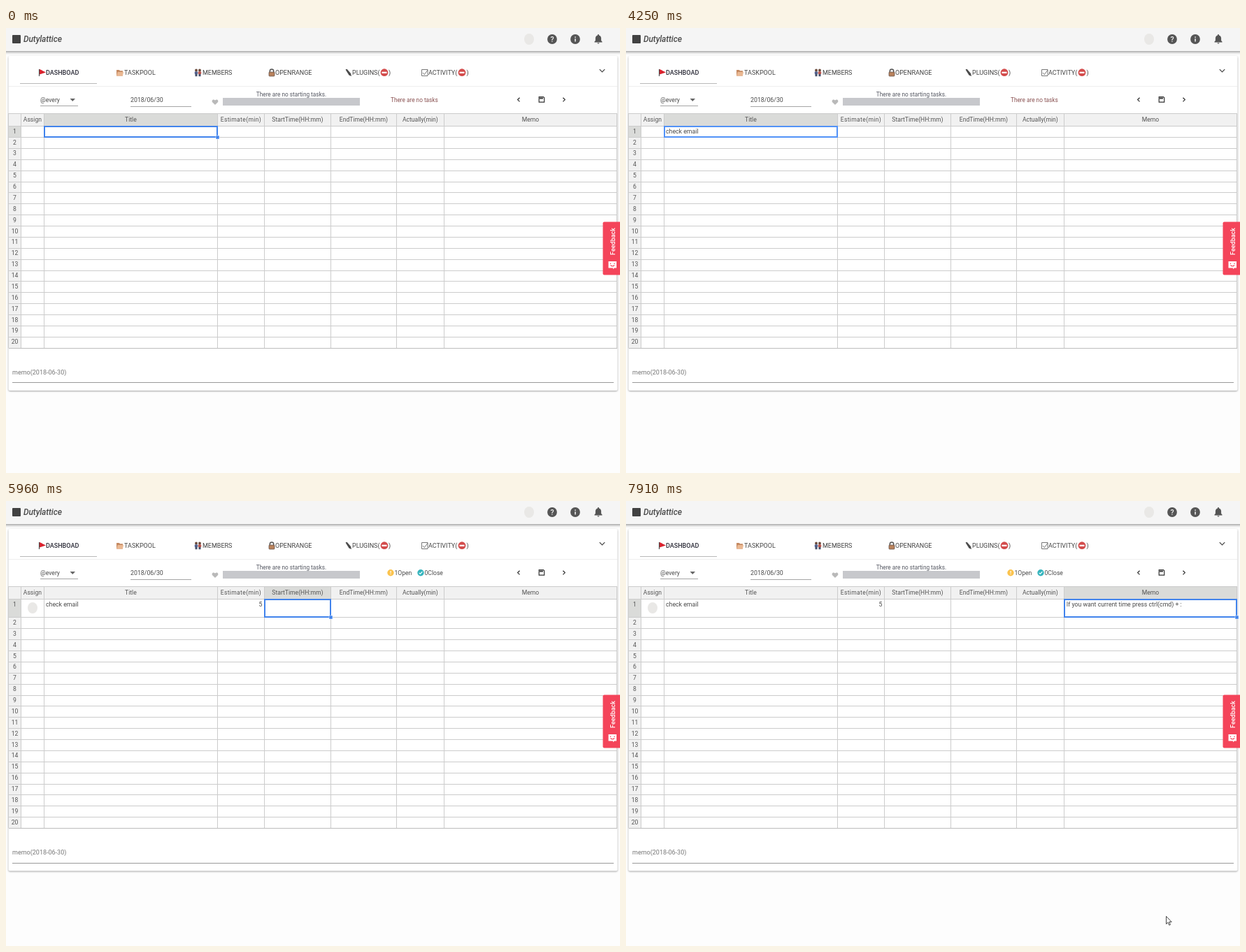
Recreate the animation shown at these times as an HTML page. Size 878 by 637 pixels, loop 7990 ms.

```html
<!DOCTYPE html>
<html lang="en">
<head>
<meta charset="utf-8">
<title>Task table</title>
<style>
  html, body { margin: 0; width: 100%; height: 100%; overflow: hidden; background: #fdfdfd; }
  svg { display: block; width: 878px; height: 637px; font-family: Roboto, sans-serif; }
  text { white-space: pre; }
  .shadow { filter: drop-shadow(0 1px 1.2px rgba(0, 0, 0, .36)); }
  .crisp { shape-rendering: crispEdges; }
</style>
</head>
<body>
<svg id="stage" viewBox="0 0 878 637"></svg>
<script>
const LOOP = 7990, TOP = 140.2, ROW = 15.87, GROW = 10.4, BLINK = 540;
const COLS = [21, 54, 302, 369, 464, 558, 626, 873];
const HEADS = ['Assign', 'Title', 'Estimate(min)', 'StartTime(HH:mm)', 'EndTime(HH:mm)', 'Actually(min)', 'Memo'];
const LINE = '#cccccc', HEAD = '#f1f1f1', ACTIVE = '#dadbd9', INK = '#4a4a4a', BLUE = '#4183ec';
const TITLE = 'check email';
const KEYS = [1130, 1210, 1290, 1670, 1840, 1910, 2310, 2610, 2690, 3480, 3700];
const svg = document.getElementById('stage');

function el(parent, name, attrs = {}, content = '') {
  const node = document.createElementNS('http://www.w3.org/2000/svg', name);
  for (const key in attrs) node.setAttribute(key, attrs[key]);
  node.textContent = content;
  parent.appendChild(node);
  return node;
}
const set = (node, attrs) => { for (const key in attrs) node.setAttribute(key, attrs[key]); };
const show = (node, on) => node.setAttribute('visibility', on ? 'visible' : 'hidden');
const group = (parent = svg, attrs) => el(parent, 'g', attrs);
const rect = (parent, x, y, width, height, fill, more) =>
  el(parent, 'rect', { x, y, width, height, fill, ...more });
const path = (parent, d, fill = 'none', stroke = 'none', width = 1) =>
  el(parent, 'path', { d, fill, stroke, 'stroke-width': width });
const circle = (parent, cx, cy, r, fill) => el(parent, 'circle', { cx, cy, r, fill });
const text = (parent, x, y, str, size = 8.75, fill = INK, more) =>
  el(parent, 'text', { x, y, 'font-size': size, fill, ...more }, str);
const middle = { 'text-anchor': 'middle' };
const mask = (parent, cx, cy) => el(parent, 'ellipse', { cx, cy, rx: 7, ry: 8, fill: '#e9e8e6' });

const card = rect(svg, 3.5, 40, 871, 479, '#fff', { rx: 2, class: 'shadow' });

function drawBar() {
  rect(svg, -5, -5, 888, 38, '#f5f5f5', { style: 'filter:drop-shadow(0 1px 2px rgba(0,0,0,.5))' });
  rect(svg, 9, 10, 12, 12, '#424242', { rx: 1 });
  text(svg, 25, 20.3, 'Dutylattice', 12, '#4a4a4a',
    { 'font-style': 'italic', 'font-weight': 500, 'letter-spacing': -.1 });
  mask(svg, 748, 16);
  const g = group();
  circle(g, 781, 16, 6.9, '#555');
  text(g, 781, 19.8, '?', 10.5, '#f5f5f5', { ...middle, 'font-weight': 500 });
  circle(g, 814, 16, 6.9, '#555');
  rect(g, 813.3, 15.2, 1.5, 4.3, '#f5f5f5');
  rect(g, 813.3, 12.4, 1.5, 1.5, '#f5f5f5');
  path(g, 'M841.5 20.5v-1l1.4-1.4v-3.4c0-2.2 1.2-3.8 3.1-4.3v-.5a1 1 0 0 1 2 0v.5c1.9.5 3.1 2.1 3.1 4.3v3.4l1.4 1.4v1zM845.6 21.2h2.8a1.4 1.4 0 0 1-2.8 0z', '#555');
}

function drawTabs() {
  const g = group();
  const label = (x, str, more) => text(g, x, 67, str, 9, '#444', more);
  path(g, 'M47.5 59v10', 'none', '#444', 1.1);
  path(g, 'M48 59q2.5 1 4.5 2.2l4.5 2.3-9 3z', '#d8232f');
  label(57, 'DASHBOAD', { 'font-weight': 500, fill: '#2c2c38' });
  rect(g, 20, 78.5, 110, 1, '#b9b9b9', { class: 'crisp' });

  path(g, 'M158 60h4l1 1.2h4v7.3h-9z', '#c58a62');
  path(g, 'M159.5 63h8.5l-1.2 5.5H158z', '#eab892');
  label(169, 'TASKPOOL');

  for (const [x, shirt] of [[272, '#51618d'], [277, '#b8564f']]) {
    circle(g, x, 60.5, 1.9, '#6b4a3b');
    rect(g, x - 2.2, 62.2, 4.4, 4, shirt, { rx: 1 });
    rect(g, x - 1.5, 66, 3, 3.2, '#47506b');
  }
  label(281, 'MEMBERS');

  path(g, 'M377.3 64v-2.2a2.7 2.7 0 0 1 5.4 0V64', 'none', '#555', 1.5);
  rect(g, 376, 63, 8, 6, '#b9825c', { rx: 1, stroke: '#5b4a42', 'stroke-width': .7 });
  label(385, 'OPENRANGE');

  path(g, 'M485.5 59.5l2-.8 5.5 6.3 1 4-3.6-1.5z', '#4b4b4b');
  label(495, 'PLUGINS(');
  label(547, ')');
  path(g, 'M594.5 59.5h8.5v9h-8.5zM596 64l2.2 2.7 5-6.7', 'none', '#777', 1);
  label(604, 'ACTIVITY(');
  label(658.5, ')');
  for (const x of [541, 652]) {
    circle(g, x, 63.7, 5.4, '#d34c4c');
    rect(g, x - 3.5, 62.7, 7, 2.2, '#fff');
  }
  path(g, 'M848.8 59.2l3.7 3.7 3.7-3.7', 'none', '#444', 1.2);
  rect(g, 4, 83, 870, 1, '#eeeeee', { class: 'crisp' });
}

function drawTools() {
  const g = group();
  text(g, 49, 105.7, '@every', 8.6);
  path(g, 'M91.5 101h7.5l-3.75 4z', '#666');
  text(g, 178, 105.7, '2018/06/30', 8.8);
  rect(g, 49, 111, 54, 1, '#a5a5a5', { class: 'crisp' });
  rect(g, 178, 111.6, 87, 1, '#a5a5a5', { class: 'crisp' });
  path(g, 'M299 110l-3.6-3.5c-2.2-2.2.6-5.9 3.6-3 3-2.900 5.8.8 3.6 3z', '#b9b9b9');
  text(g, 408, 97.6, 'There are no starting tasks.', 8.25, '#555862', middle);
  rect(g, 310, 100, 196, 11, '#c7c8cc', { class: 'crisp' });
  path(g, 'M734.5 99.8l-2.8 2.8 2.8 2.8M796.5 99.8l2.8 2.8-2.8 2.8', 'none', '#333', 1.3);
  path(g, 'M762.2 98.5h6.2l1.3 1.3v6.4h-7.5z', 'none', '#333', 1.2);
  rect(g, 763, 99.5, 5, 2, '#333');
}

drawBar();
drawTabs();
drawTools();

const none = text(svg, 550, 105.7, 'There are no tasks', 8.25, '#8a5252');
const counts = group();
circle(counts, 550, 102.7, 4.7, '#fbc34d');
rect(counts, 549.5, 100, 1.1, 3.2, '#fff');
rect(counts, 549.5, 104, 1.1, 1.1, '#fff');
text(counts, 555.5, 105.7, '1Open', 8.6);
circle(counts, 593, 102.7, 4.7, '#35b4bd');
path(counts, 'M590.7 102.8l1.7 1.7 3-3.3', 'none', '#fff', 1.2);
text(counts, 598.5, 105.7, '0Close', 8.6);

// Everything below the first row moves down when that row grows
const lower = group();
const numberAt = (parent, n) =>
  text(parent, 12.5, TOP + ROW * (n - .5) + 2.6, n, 8.6, '#555', middle);
rect(lower, 4, TOP + ROW, 17, 19 * ROW, HEAD, { class: 'crisp' });
for (let n = 1; n <= 20; n++) {
  rect(lower, 4, TOP + ROW * n, 870, 1, n < 20 ? LINE : '#bdbdbd', { class: 'crisp' });
  if (n > 1) numberAt(lower, n);
}
text(lower, 9, 495.5, 'memo(2018-06-30)', 9, '#777');
rect(lower, 9, 507.2, 860, 1, '#999', { class: 'crisp' });

// Header and first row
const table = group(svg, { class: 'crisp' });
rect(table, 4, 122, 870, 18, HEAD);
const headMark = rect(table, 54, 123, 248, 17, ACTIVE);
const rowMark = rect(table, 4, TOP, 17, 16, ACTIVE);
const rowFill = rect(table, 22, TOP + 1, 851, ROW + GROW - 1, '#fdf4e0');
rect(table, 4, 122, 870, 1, LINE);
rect(table, 4, TOP, 870, 1, LINE);
const verticals = [3, ...COLS].map(x => rect(table, x, 122, 1, 336, LINE));
HEADS.forEach((name, i) => text(svg, (COLS[i] + COLS[i + 1]) / 2 + .4, 134, name, 8.6, '#555',
  { ...middle, 'letter-spacing': i === 2 ? .32 : 0 }));
numberAt(svg, 1);

const face = mask(svg, 38, 153);
const box = rect(svg, 0, 141, 0, 0, 'none', { 'stroke-width': 2, class: 'crisp' });
const handle = rect(svg, 0, 0, 5, 5, BLUE, { stroke: '#fff', 'stroke-width': .5 });
const BASE = 150.6;
const title = text(svg, 57, BASE, '');
const estimate = text(svg, 305, BASE, '5');
const memo = text(svg, 629.8, BASE, 'If you want current time press ctrl(cmd) + :');
const caret = rect(svg, 0, 142.5, 1, 11, '#111', { class: 'crisp' });

// Feedback tab
rect(svg, 853.5, 277.5, 28, 76, '#f4445a', { rx: 2 });
text(svg, 0, 0, 'Feedback', 9, '#fff',
  { ...middle, 'font-weight': 500, transform: 'translate(870.5 305.5) rotate(-90)' });
path(svg, 'M861.5 334h11.5v9.5h-3l-2 1.8v-1.8h-6.5z', '#fff');
path(svg, 'M864.5 336.5v1.5M870 336.5v1.5M864.5 339.5q2.8 3 5.5 0', 'none', '#f4445a', 1.2);

const pointer = path(svg, 'M772.5 594.5v11l2.5-2.3 1.8 4 1.7-.8-1.8-3.8h3.5z', '#fff', '#333', .9);

// Selected column over time
const MOVES = [[0, 1], [4800, 2], [5960, 3], [6660, 4], [6830, 5], [6980, 6]];

function draw(t) {
  const col = MOVES.filter(([at]) => t >= at).pop()[1];
  const done = t >= 4800, grow = done ? GROW : 0;
  const height = ROW + grow, bottom = Math.round(TOP + height);
  const inEditor = (t >= 440 && !done) || (t >= 5580 && t < 5960);
  const framed = inEditor && t >= 520;
  const left = COLS[col], right = COLS[col + 1];

  set(card, { height: 479 + grow });
  set(lower, { transform: `translate(0 ${grow})` });
  set(rowMark, { height });
  verticals.forEach(v => set(v, { height: 336 + grow }));
  set(headMark, { x: left, width: right - left });
  show(rowFill, done && t < 5960);
  show(face, done);

  set(box, {
    x: left + 1, width: right - left - 1, height: bottom - 141,
    stroke: framed ? '#5292f7' : BLUE, fill: framed ? '#fff' : 'none'
  });
  set(handle, { x: right - 2, y: bottom - 2 });
  show(handle, !framed);

  title.textContent = TITLE.slice(0, KEYS.filter(at => t >= at).length);
  show(estimate, t >= 5580);
  set(estimate, t < 5960 ? { x: 305, 'text-anchor': 'start' } : { x: 366.5, 'text-anchor': 'end' });
  show(memo, t >= 7210);

  const last = [440, ...KEYS, 5580].filter(at => t >= at).pop();
  const start = done ? 305 : 57, entry = done ? estimate : title;
  set(caret, { x: Math.round(start + entry.getComputedTextLength()) });
  show(caret, inEditor && (t - last) % (2 * BLINK) < BLINK);

  show(none, t < 4950);
  show(counts, t >= 4950);
  show(pointer, t >= 7910);
}

const began = performance.now();
function tick() {
  draw((performance.now() - began) % LOOP);
  requestAnimationFrame(tick);
}
draw(0);
requestAnimationFrame(tick);
</script>
</body>
</html>
```
